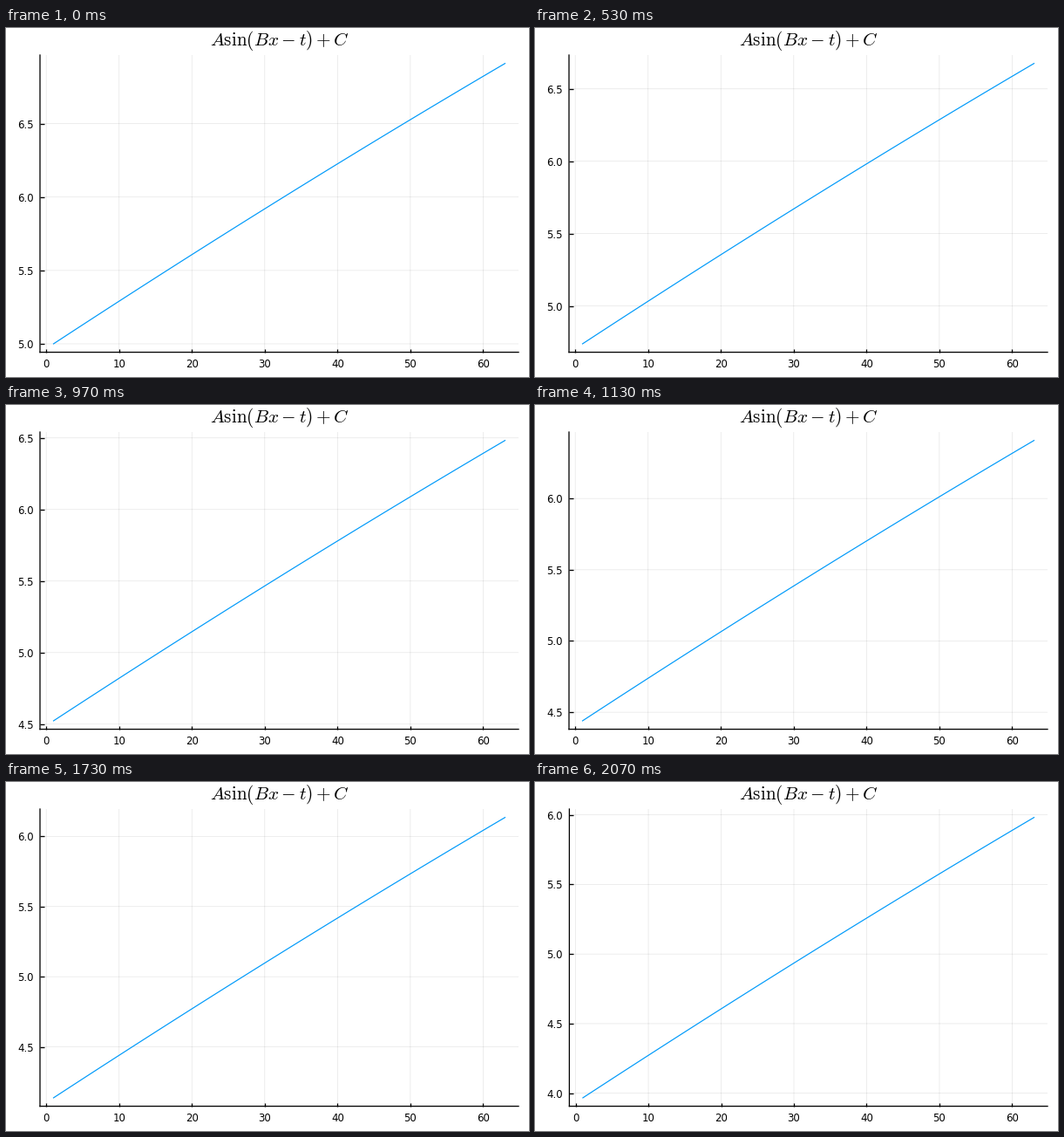
These frames come from a looping animation (600x400 px, 2.11 s). A matplotlib script:

```python
import numpy as np
import matplotlib.pyplot as plt
from matplotlib.animation import FuncAnimation
from matplotlib.ticker import MultipleLocator, FormatStrFormatter

W, H, DPI = 600, 400, 100
LOOP_MS, TICK_MS, STEPS = 2110, 10, 63
LEFT, RIGHT, TOP, BOTTOM = 39, 588, 31, 371.6
PX = 72 / DPI  # points per pixel

plt.rcParams.update({
    "font.family": "DejaVu Sans",
    "mathtext.fontset": "cm",
    "path.snap": False,
})

A, PHASE, RATE = 62.75, 1.0265, 0.0005
x = np.arange(1, 64)


def wave(step):
    """A sin(Bx - t) + C, anchored so the first point starts at 5."""
    s = 2 * (x - 1) - step
    return 5 + A * (np.sin(PHASE + RATE * s) - np.sin(PHASE))


def padded(lo, hi):
    pad = 0.03 * (hi - lo)
    return lo - pad, hi + pad


fig = plt.figure(figsize=(W / DPI, H / DPI), dpi=DPI, facecolor="white")
ax = fig.add_axes([0, 0, 1, 1])
ax.set_xlim(*padded(x[0], x[-1]))
ax.xaxis.set_major_locator(MultipleLocator(10))
ax.yaxis.set_major_locator(MultipleLocator(0.5))
ax.yaxis.set_major_formatter(FormatStrFormatter("%.1f"))
ax.spines[["top", "right"]].set_visible(False)
ax.spines[["left", "bottom"]].set_linewidth(1.3 * PX)
ax.tick_params(direction="in", length=4.5 * PX, width=1.3 * PX,
               labelsize=11.8 * PX)
ax.tick_params(axis="x", pad=7 * PX)
ax.tick_params(axis="y", pad=7.5 * PX)
ax.grid(color="black", alpha=0.1, linewidth=0.7 * PX)
ax.set_axisbelow(True)

curve, = ax.plot(x, wave(0), color="#009AFA", linewidth=1.2 * PX)
title = fig.text(0.5, 1 - 20 / H, r"$A\mathrm{sin}(Bx - t) + C$",
                 fontsize=21.2 * PX, ha="center", va="baseline")


def update(i):
    # The wave advances at 30 steps per second.
    step = min(int((i * TICK_MS + 5) * 0.03), STEPS - 1)
    y = wave(step)
    lo, hi = padded(y[0], y[-1])
    # The margin widens slightly once the 4.0 label shows.
    left = LEFT + (0.4 if lo < 4 else 0)
    ax.set_position([left / W, 1 - BOTTOM / H,
                     (RIGHT - left) / W, (BOTTOM - TOP) / H])
    title.set_x((left + RIGHT) / 2 / W)
    ax.set_ylim(lo, hi)
    curve.set_ydata(y)
    return curve, title


anim = FuncAnimation(fig, update, frames=LOOP_MS // TICK_MS, interval=TICK_MS,
                     repeat=True, repeat_delay=0, cache_frame_data=False)
plt.show()
```
